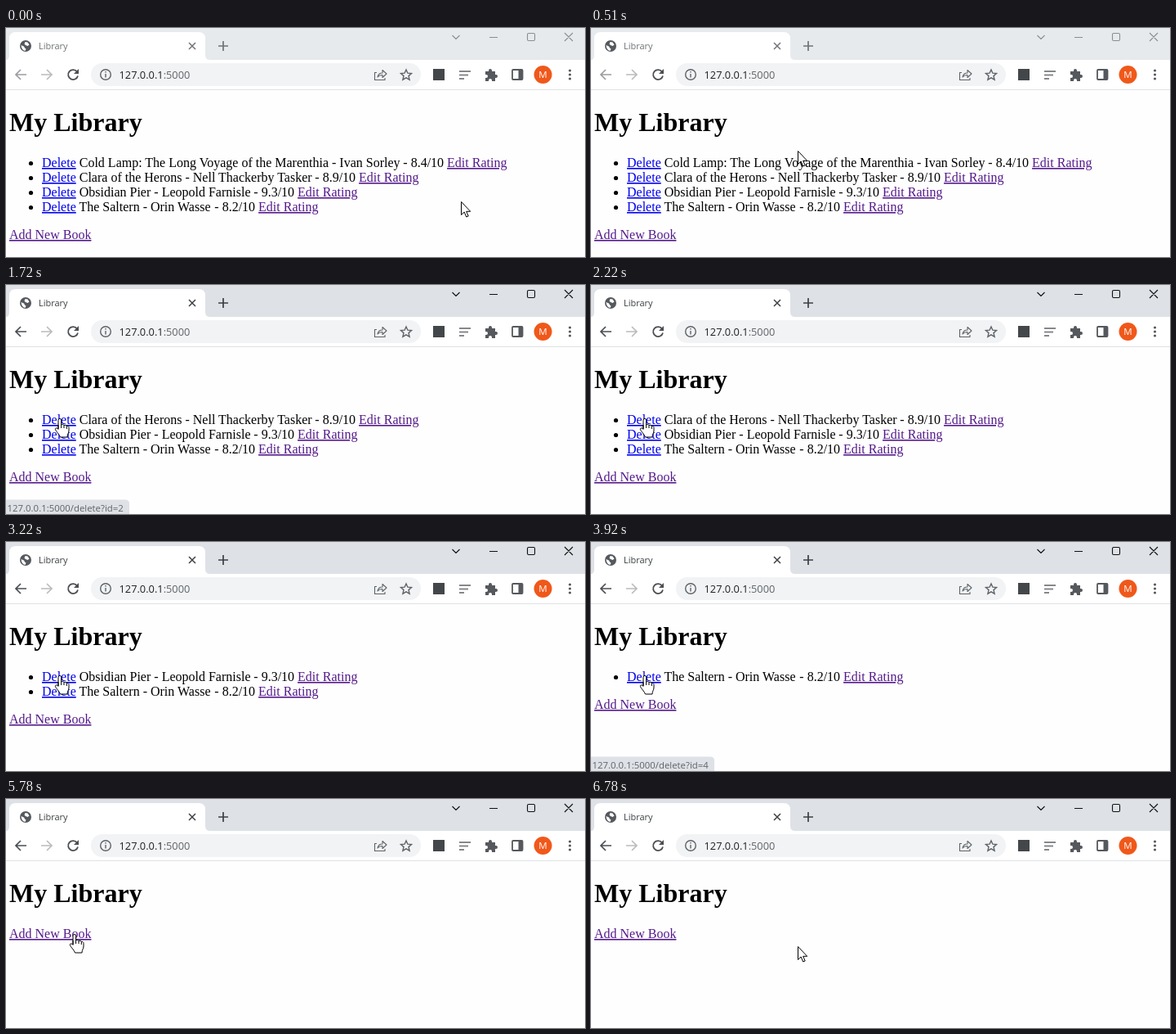
These frames come from a looping animation (709 by 280 pixels, 8.33 s). An HTML page:

```html
<!DOCTYPE html>
<html lang="en">
<head>
<meta charset="utf-8">
<title>Library</title>
<style>
  html, body { margin: 0; width: 100%; height: 100%; overflow: hidden; background: #fefefe; }
  svg {
    display: block; width: 100%; height: 100%;
    --frame: #e7eaed; --title: #6f7276; --button: #8b8d90; --back: #9b9da0;
  }
  svg.active { --frame: #dee1e6; --title: #3c4043; --button: #111; --back: #4b4e52; }
  text { white-space: pre; }
  .ui { font-family: "Open Sans", "Noto Sans", sans-serif; }
  .page { font: 16px "Liberation Serif", "Times New Roman", serif; }
  .heading { font-size: 32px; font-weight: bold; }
  .link { fill: #00e; text-decoration: underline; }
  .visited { fill: #551a8b; text-decoration: underline; }
  .line { fill: none; stroke: #5f6368; stroke-width: 1.4; }
  .thin { fill: none; stroke: #5f6368; stroke-width: 1.1; stroke-linejoin: round; }
  .button { fill: none; stroke: var(--button); stroke-width: 1.1; }
  .cursor { fill: #fff; stroke: #000; stroke-width: 1; stroke-linejoin: round; }
</style>
</head>
<body>
<svg id="stage" viewBox="0 0 709 280">
  <rect width="709" height="280" fill="#fefefe"/>

  <!-- Tab strip -->
  <rect width="709" height="39" fill="var(--frame)"/>
  <path d="M0 39q4 0 4-6V13q0-8 8-8h224q8 0 8 8v20q0 6 6 6z" fill="#fff"/>
  <circle cx="24" cy="22" r="7" fill="#55595e"/>
  <path d="M18.500 21l3.500 1.500 1 2 1.500 1-1 2.500q-4.500-1-5-7M23.500 17l3 .5 2 3-2 1.500-2.500-1-1.500-1.500z" fill="#fff"/>
  <text class="ui" x="40" y="26" font-size="11" fill="var(--title)">Library</text>
  <path d="M224 18l8 8m0-8l-8 8" fill="none" stroke="var(--title)" stroke-width="1.500"/>
  <path d="M260 22h12m-6-6v12" fill="none" stroke="var(--title)" stroke-width="1.700"/>
  <path class="button" d="M546.500 9l4.500 4.500 4.500-4.500M592 11.500h10M640 6.500h6q1.500 0 1.500 1.500v6q0 1.500-1.500 1.500h-6q-1.500 0-1.500-1.500v-6q0-1.500 1.500-1.500M684 6l10 10m0-10l-10 10"/>

  <!-- Toolbar -->
  <rect y="39" width="709" height="36" fill="#fff"/>
  <path d="M0 75.500h709" stroke="#dfe1e5"/>
  <path d="M25 57H12m6-6l-6 6 6 6" fill="none" stroke="var(--back)" stroke-width="1.700"/>
  <path d="M43 57h13m-6-6l6 6-6 6" fill="none" stroke="#babcbe" stroke-width="1.700"/>
  <path d="M87 53.500a6 6 0 1 0 1 5" fill="none" stroke="#4b4e52" stroke-width="1.800"/>
  <path d="M89 50v6h-6z" fill="#4b4e52"/>
  <rect x="104" y="43" width="404" height="28" rx="14" fill="#f1f3f4"/>
  <circle class="line" cx="122" cy="57" r="6.300"/>
  <path class="line" d="M122 56v4.500m0-7.500v1.600"/>
  <text class="ui" x="138.500" y="62" font-size="12.800" fill="#202124">127.0.0.1<tspan fill="#5f6368">:5000</tspan></text>
  <path class="thin" d="M454 54.500h-2.500v9h12.500v-2.500M455 60q1-5 6-5v-3.500l5 4.500-5 4.500v-3q-4 0-6 2.500z"/>
  <path class="line" d="M490 51l1.900 4.200 4.600.4-3.500 3 1.100 4.600-4.100-2.400-4.100 2.400 1.100-4.600-3.500-3 4.600-.4z"/>
  <rect x="523" y="50" width="14" height="14" fill="#44474a"/>
  <path d="M555 53h14m-14 4.500h11m-11 4.500h6" stroke="#85888b" stroke-width="2"/>
  <path d="M587 53h4v-1a2 2 0 0 1 4 0v1h4v4h1a2 2 0 0 1 0 4h-1v4h-4v-1a2 2 0 0 0-4 0v1h-4v-4h1a2 2 0 0 0 0-4h-1z" fill="#55585c"/>
  <rect x="620" y="51" width="12.500" height="12" rx="1" fill="none" stroke="#55585c" stroke-width="1.800"/>
  <rect x="627.500" y="51" width="5" height="12" fill="#55585c"/>
  <circle cx="657.500" cy="57" r="11" fill="#f0581a"/>
  <text class="ui" x="657.500" y="61.300" font-size="11.500" text-anchor="middle" fill="#fff">M</text>
  <g fill="#55585c"><circle cx="690.500" cy="52" r="1.600"/><circle cx="690.500" cy="57" r="1.600"/><circle cx="690.500" cy="62" r="1.600"/></g>

  <!-- Page -->
  <g class="page">
    <text class="heading" x="4" y="126">My Library</text>
    <g id="books"></g>
    <text id="add" class="visited" x="4">Add New Book</text>
  </g>

  <g id="status">
    <path d="M0 262.500h146q5 0 5 5V280H0z" fill="#dee1e6"/>
    <text id="address" class="ui" x="1.500" y="277" font-size="11.400" fill="#5f6368"></text>
  </g>

  <g id="pointer" class="cursor">
    <path id="arrow" d="M.5.5v16l3.700-3.500 2.500 6 2.500-1-2.500-5.700h5z"/>
    <g id="hand">
      <path d="M-2 2.200a1.800 1.800 0 0 1 3.600 0V8c1-.9 3-.6 3.400.6 1-.7 2.900-.4 3.300.9 1.200-.4 2.700.2 2.700 1.900V15c0 3.500-2 4-2 8H.5C-.5 19.500-5 16-5.600 13.600-6 11.600-3.600 11.200-2 13.400Z"/>
      <path d="M-2 13V8M1.600 8v4M5 8.600V12M8.300 9.500V13" fill="none"/>
    </g>
  </g>
</svg>
<script>
const LOOP = 8330;
const FOCUS_TIME = 1570;
const ROW_HEIGHT = 18;
const FIRST_BASELINE = 170;
const deleteTimes = [1670, 3120, 3870, 4680];

// Title and author, rating, left edge of the rating
const books = [
  ["Cold Lamp: The Long Voyage of the Marenthia - Ivan Sorley", "8.4", 486.3],
  ["Clara of the Herons - Nell Thackerby Tasker", "8.9", 378.3],
  ["Obsidian Pier - Leopold Farnisle", "9.3", 303.3],
  ["The Saltern - Orin Wasse", "8.2", 255.3],
];

const $ = id => document.getElementById(id);
const clamp = v => Math.max(0, Math.min(1, v));
const progress = (t, from, to) => clamp((t - from) / (to - from));
const ease = p => p * p * (3 - 2 * p);
const mix = (a, b, p) => a + (b - a) * p;
const show = (node, visible) => node.setAttribute("visibility", visible ? "visible" : "hidden");

$("books").innerHTML = books.map(([label, rating, x]) => `<g>
  <circle cx="30.500" cy="-4.500" r="2.600"/>
  <text x="44"><tspan class="link">Delete</tspan> ${label}<tspan x="${x}">- ${rating}/10 </tspan><tspan class="visited">Edit Rating</tspan></text>
</g>`).join("");
const rows = [...$("books").children];

function pointerAt(t) {
  if (t < 1020) {
    const p = ease(progress(t, 30, 860));
    return { x: mix(557, 66, p), y: mix(212, 168, p) - 148 * p * (1 - p), hand: p > 0.95 };
  }
  if (t < 5730) return { x: 66, y: mix(168, 163, progress(t, 1020, 1220)), hand: true };
  const p = ease(progress(t, 5660, 6280));
  const x = t < 6780 ? mix(66, 252, p) : 253;
  return { x, y: mix(163, 180, p), hand: x < 105 };
}

function statusOpacity(t) {
  if (t < 1000) return 0;
  if (t < 2220) return mix(0.4, 1, progress(t, 1020, 1220)) * (1 - progress(t, 2050, 2220));
  if (t < 3370) return 0;
  return mix(0.5, 1, progress(t, 3370, 3420)) * (1 - progress(t, 4260, 4430));
}

function draw(t) {
  $("stage").classList.toggle("active", t >= FOCUS_TIME);

  const deleted = deleteTimes.filter(time => t >= time).length;
  rows.forEach((row, i) => {
    show(row, i >= deleted);
    row.setAttribute("transform", `translate(0 ${FIRST_BASELINE + ROW_HEIGHT * (i - deleted)})`);
  });
  const left = books.length - deleted;
  $("add").setAttribute("y", FIRST_BASELINE + (left ? ROW_HEIGHT * left + 16 : 0));

  $("status").setAttribute("opacity", statusOpacity(t));
  $("address").textContent = `127.0.0.1:5000/delete?id=${t < 3000 ? 2 : 4}`;

  const { x, y, hand } = pointerAt(t);
  $("pointer").setAttribute("transform", `translate(${Math.round(x)} ${Math.round(y)})`);
  show($("hand"), hand);
  show($("arrow"), !hand);
}

const start = performance.now();
function tick() {
  draw((performance.now() - start) % LOOP);
  requestAnimationFrame(tick);
}
tick();
</script>
</body>
</html>
```
